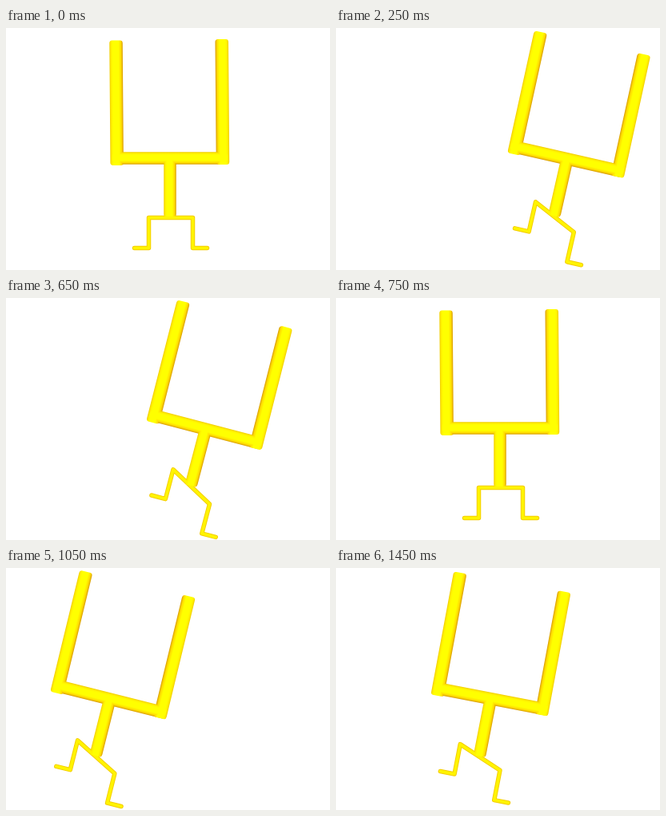
An HTML page with a canvas that plays this animation: 405x303 px, repeating every 1500 ms.

```html
<!DOCTYPE html>
<html lang="en">
<head>
<meta charset="utf-8">
<title>Walking goalpost</title>
<style>
  html, body { margin: 0; width: 100%; height: 100%; overflow: hidden; background: #fff; }
  canvas { display: block; width: 405px; height: 303px; }
</style>
</head>
<body>
<canvas id="stage" width="405" height="303"></canvas>
<script>
const ctx = document.getElementById('stage').getContext('2d');
const LOOP = 1500, STEP = 50;
const PIVOT = { x: 205, y: 198 };
const SWAY = 88, TILT = 14.8 * Math.PI / 180, LIFT = 15.2;
const METAL = [[0, '#f0cc00'], [0.12, '#fff000'], [0.25, '#ffff00'],
               [0.68, '#ffff00'], [0.86, '#ffdc00'], [1, '#d89c00']];

// Cylinder from (x1,y1) to (x2,y2), darkest on the right of its direction
function tube(x1, y1, x2, y2, w) {
  const len = Math.hypot(x2 - x1, y2 - y1);
  ctx.save();
  ctx.translate(x1, y1);
  ctx.rotate(Math.atan2(y2 - y1, x2 - x1));
  const shade = ctx.createLinearGradient(0, -w / 2, 0, w / 2);
  METAL.forEach(([at, color]) => shade.addColorStop(at, color));
  ctx.fillStyle = shade;
  ctx.beginPath();
  ctx.roundRect(0, -w / 2, len, w, 3.5);
  ctx.fill();
  ctx.restore();
}

function legs(lift) {
  ctx.beginPath();
  ctx.moveTo(160.5, 275.5 - lift);
  ctx.lineTo(178.5, 275.5 - lift);
  ctx.lineTo(178.5, 237.5 - lift);
  ctx.lineTo(233.5, 237.5 + lift);
  ctx.lineTo(233.5, 275.5 + lift);
  ctx.lineTo(251.5, 275.5 + lift);
  ctx.lineCap = ctx.lineJoin = 'round';
  for (const [width, color] of [[5.5, '#f4cc00'], [3.6, '#fff400']]) {
    ctx.lineWidth = width;
    ctx.strokeStyle = color;
    ctx.stroke();
  }
}

function draw(t) {
  const phase = 2 * Math.PI * t / LOOP;
  const swing = -Math.sin(4 * phase);
  ctx.clearRect(0, 0, 405, 303);
  ctx.save();
  ctx.translate(PIVOT.x + SWAY * Math.sin(phase), PIVOT.y);
  ctx.rotate(TILT * swing);
  ctx.translate(-PIVOT.x, -PIVOT.y);
  // Lighten lets the tubes melt together at the joints
  ctx.globalCompositeOperation = 'lighten';
  tube(205, 236.5, 205, 160, 15.5);
  legs(LIFT * swing);
  tube(138.7, 172, 137.5, 15.5, 16.5);
  tube(269.7, 14, 271, 171, 16.5);
  tube(133, 163, 277, 163, 15.5);
  ctx.restore();
}

function tick() {
  const t = performance.now() % LOOP;
  draw(Math.floor(t / STEP) * STEP);
  requestAnimationFrame(tick);
}
tick();
</script>
</body>
</html>
```
